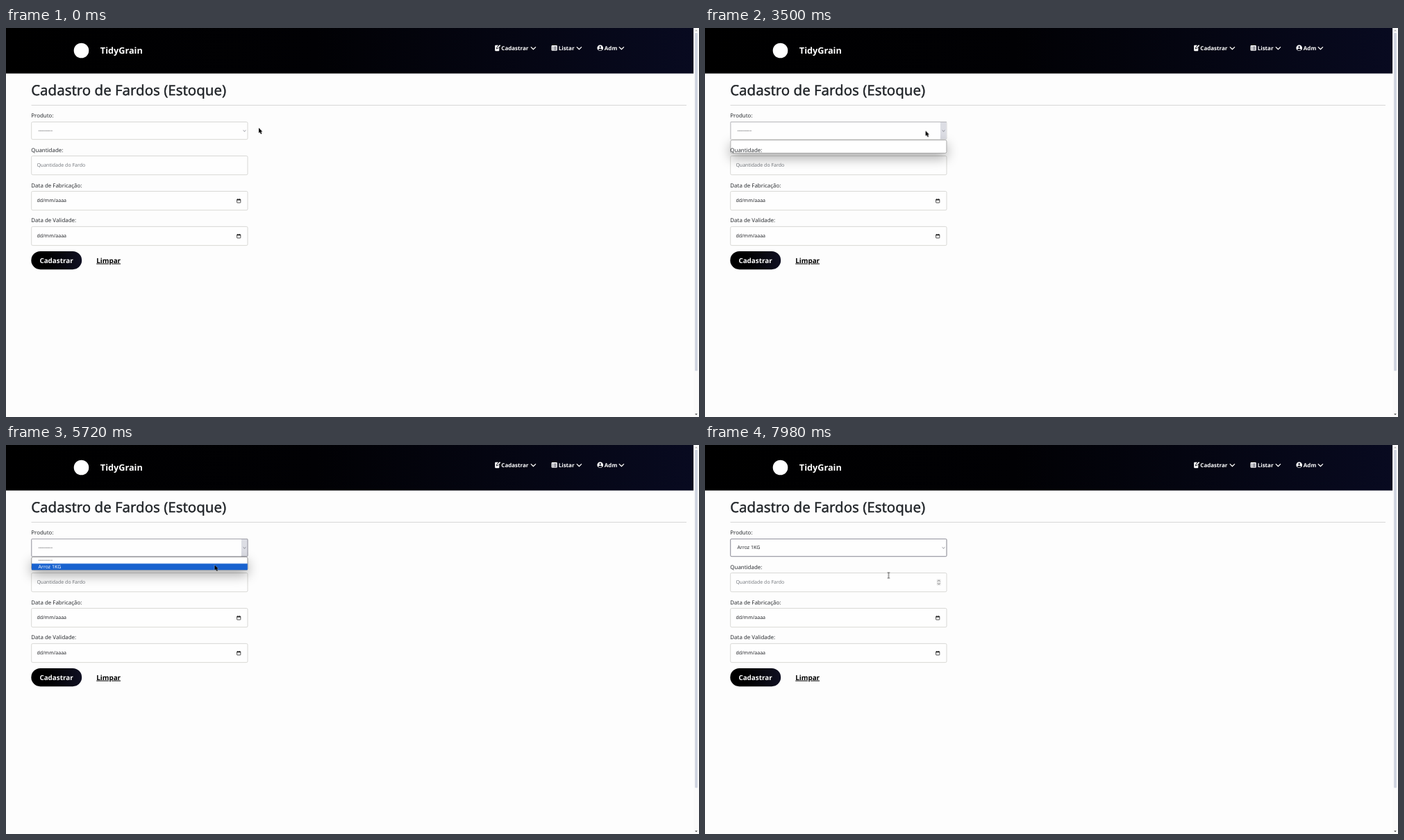
These frames come from a looping animation (998x561 px, 8 s). An HTML page:

```html
<!DOCTYPE html>
<html lang="pt-BR">
<head>
<meta charset="utf-8">
<title>Cadastro de Fardos</title>
<style>
  html, body { margin: 0; width: 100%; height: 100%; overflow: hidden; background: #fdfdfd; }
  svg { display: block; width: 998px; height: 561px; }
  text {
    font-family: "Noto Sans", "Open Sans", sans-serif;
    font-size: 7px; fill: #24262a;
    text-rendering: geometricPrecision; white-space: pre;
  }
  .title { font-size: 20.47px; fill: #212529; stroke: #212529; stroke-width: .4; }
  .label { font-size: 7.93px; fill: #2b2e32; }
  .hint { fill: #777b80; }
  .brand { font-size: 12.7px; font-weight: 700; fill: #fff; }
  .nav text { font-size: 8px; font-weight: 700; fill: #fff; }
  .action { font-size: 9.85px; font-weight: 700; }
  .field { fill: #fefefe; stroke: #cfcfcb; stroke-width: .8; }
  .chev { fill: none; stroke: #fff; stroke-width: 1.3; stroke-linecap: round; stroke-linejoin: round; }

  /* 1% of the loop is 80 ms */
  .step, .glide { animation: 8s infinite both; }
  .step { animation-timing-function: step-end; }
  .glide { animation-timing-function: linear; }

  .pointer { animation-name: move; }
  @keyframes move {
    0%, .25%    { transform: translate(364px, 144px); }
    10%, 17.5%  { transform: translate(363.6px, 143.6px); }
    19%, 23%    { transform: translate(358.5px, 143px); }
    29.75%      { transform: translate(345px, 143.8px); }
    33%, 33.25% { transform: translate(327.5px, 147.5px); }
    37%, 50.5%  { transform: translate(317.6px, 148.2px); }
    52.75%, 54% { transform: translate(326px, 151.3px); }
    60%         { transform: translate(300px, 165px); }
    63.25%, 64.5% { transform: translate(306.2px, 166px); }
    68.5%, 70.25% { transform: translate(301.5px, 174px); }
    71.5%, 73.5% { transform: translate(300.5px, 173px); }
    75%, 87.25% { transform: translate(301.6px, 174.4px); }
    91%         { transform: translate(335px, 178px); }
    96.5%, 97.75% { transform: translate(273px, 183px); }
    99.75%, 100% { transform: translate(264.4px, 188px); }
  }
  .arrow { animation-name: arrow; }
  @keyframes arrow { 0% { opacity: 1 } 98.25%, 100% { opacity: 0 } }
  .over-input { animation-name: over-input; }
  @keyframes over-input { 0% { opacity: 0 } 98.25%, 100% { opacity: 1 } }

  .over-select { animation-name: over-select; }
  @keyframes over-select { 0% { opacity: 0 } 30.5% { opacity: 1 } 84%, 100% { opacity: 0 } }
  .focus { animation-name: focus; }
  @keyframes focus { 0% { opacity: 0 } 44.5%, 100% { opacity: 1 } }

  .popup { animation-name: popup; }
  @keyframes popup { 0% { opacity: 0 } 43.73% { opacity: 1 } 82.48%, 100% { opacity: 0 } }
  .options { animation-name: options; }
  @keyframes options { 0%, 44% { opacity: 0 } 45.5%, 100% { opacity: 1 } }
  .mark { animation-name: mark; }
  @keyframes mark { 0% { transform: none } 66.5%, 100% { transform: translateY(9.2px) } }
  .first { animation-name: first; }
  @keyframes first { 0% { fill: #fff } 66.5%, 100% { fill: #24262a } }
  .second { animation-name: second; }
  @keyframes second { 0% { fill: #24262a } 66.5%, 100% { fill: #fff } }

  .empty { animation-name: empty; }
  @keyframes empty { 0% { opacity: 1 } 82.48%, 100% { opacity: 0 } }
  .chosen { animation-name: chosen; }
  @keyframes chosen { 0% { opacity: 0 } 82.48%, 100% { opacity: 1 } }
</style>
</head>
<body>
<svg viewBox="0 0 998 561">
  <defs>
    <linearGradient id="bar">
      <stop offset="0" stop-color="#000"/>
      <stop offset=".45" stop-color="#010104"/>
      <stop offset="1" stop-color="#080a20"/>
    </linearGradient>
    <linearGradient id="pill">
      <stop offset=".3" stop-color="#000"/>
      <stop offset="1" stop-color="#101022"/>
    </linearGradient>
    <filter id="blur" x="-20%" y="-300%" width="140%" height="700%">
      <feGaussianBlur stdDeviation="9"/>
    </filter>
    <path id="chev" class="chev" d="M-3.2-1.6 0 1.6 3.2-1.6"/>
    <g id="calendar">
      <rect x="-2.6" y="-2.2" width="5.2" height="4.9" rx=".5" fill="none" stroke="#222" stroke-width=".8"/>
      <path d="M-2.6-2.4h5.2v1.5h-5.2zM-1.8-3.1h.8v1h-.8zM1-3.1h.8v1H1z" fill="#222"/>
    </g>
  </defs>

  <rect width="998" height="561" fill="#fdfdfd"/>
  <rect width="990.3" height="65.6" fill="url(#bar)"/>

  <!-- scrollbar -->
  <rect x="990.3" width="7.7" height="561" fill="#fafafa"/>
  <rect x="992.2" y="7" width="3.7" height="487.5" rx="1.2" fill="#ced3df"/>
  <path d="M992.2 4.4h3.6L994 2.4z" fill="#aaa"/>
  <path d="M992.2 556.2h3.6l-1.8 2.1z" fill="#444"/>

  <circle cx="108.5" cy="32.5" r="10.8" fill="#fff"/>
  <text class="brand" x="135.8" y="36.8">TidyGrain</text>

  <g class="nav">
    <path d="M705.2 24.8h3.8l-2.7 3.4-.3 2.3 2.2-.5 2.1-2v4.2q0 1-1 1h-4.1q-1 0-1-1v-6.4q0-1 1-1z" fill="#fff"/>
    <path d="M707 29.4l.4-1.5 3-3.2q.8-.6 1.4 0t0 1.4l-3.2 2.9z" fill="#fff"/>
    <text x="713.3" y="31.7">Cadastrar</text>
    <use href="#chev" x="759.4" y="29.2"/>

    <rect x="785.6" y="25" width="8.2" height="7.8" rx="1.1" fill="#fff"/>
    <path d="M787 27.3h1.2m1 0h3.3M787 29.2h1.2m1 0h3.3M787 31.1h1.2m1 0h3.3" stroke="#05061a" stroke-width=".8"/>
    <text x="795.7" y="31.7">Listar</text>
    <use href="#chev" x="825.4" y="29.2"/>

    <circle cx="855.7" cy="28.8" r="4.3" fill="#fff"/>
    <circle cx="855.7" cy="27.5" r="1.3" fill="#05061a"/>
    <path d="M853.1 31.4q.4-1.7 1.8-1.7h1.6q1.4 0 1.8 1.7-2.6 2-5.2 0z" fill="#05061a"/>
    <text x="861.8" y="31.7">Adm</text>
    <use href="#chev" x="886.4" y="29.2"/>
  </g>

  <text class="title" x="36.2" y="97.4">Cadastro de Fardos (Estoque)</text>
  <path d="M36.5 111.4H980" stroke="#cfcfcf" stroke-width=".8"/>

  <!-- product select -->
  <text class="label" x="36.3" y="129.2">Produto:</text>
  <rect class="field" x="36.7" y="135.5" width="311.3" height="25.2" rx="1.8"/>
  <rect class="step over-select" x="338.8" y="135.9" width="8.9" height="24.4" fill="#dcdde4"/>
  <rect class="step focus" x="36.7" y="135.5" width="311.3" height="25.2" rx="1.2" fill="none" stroke="#8b8b98" stroke-width=".9"/>
  <path d="M341.6 147.4l1.9 1.8 1.9-1.8" fill="none" stroke="#6c6e76" stroke-width=".8"/>
  <text class="step empty" x="46.6" y="150.4">---------</text>
  <text class="step chosen" x="46.6" y="150.4">Arroz 1KG</text>

  <!-- quantity -->
  <rect class="field" x="36.7" y="184.5" width="311.3" height="27.2" rx="1.8"/>
  <text class="hint" x="44.4" y="200.4">Quantidade do Fardo</text>
  <g class="step over-input">
    <rect x="333.8" y="193.6" width="5.8" height="8.8" rx=".6" fill="#e6e6e6"/>
    <path d="M335 196.6l1.7-1.7 1.7 1.7M335 199.4l1.7 1.7 1.7-1.7" fill="none" stroke="#666" stroke-width=".8"/>
  </g>

  <!-- dates -->
  <text class="label" x="36.3" y="229.5">Data de Fabricação:</text>
  <rect class="field" x="36.7" y="235.5" width="311.3" height="27.2" rx="1.8"/>
  <text x="44.4" y="251.4">dd/mm/aaaa</text>
  <use href="#calendar" x="335.2" y="249.3"/>

  <text class="label" x="36.3" y="280.4">Data de Validade:</text>
  <rect class="field" x="36.7" y="286.4" width="311.3" height="27.2" rx="1.8"/>
  <text x="44.4" y="302.3">dd/mm/aaaa</text>
  <use href="#calendar" x="335.2" y="300.2"/>

  <rect x="36.3" y="322" width="72.9" height="26.2" rx="13.1" fill="url(#pill)"/>
  <text class="action" x="48.4" y="338.6" style="fill:#fff">Cadastrar</text>
  <text class="action" x="130.2" y="338.6" style="fill:#000" text-decoration="underline">Limpar</text>

  <!-- option list -->
  <g class="step popup">
    <rect x="37" y="168" width="311" height="19" fill="#000" opacity=".36" filter="url(#blur)"/>
    <rect x="36.8" y="135.9" width="301.9" height="24.4" fill="#fefefe"/>
    <text x="46.6" y="150.4">---------</text>
    <path d="M37 160.7V135.5H348" fill="none" stroke="#a5a5ac" stroke-width=".7"/>
    <rect x="36.9" y="161.6" width="311" height="18.8" rx="2" fill="#fff" stroke="#8d8d8d" stroke-width=".7"/>
  </g>
  <text class="label" x="36.3" y="178.6">Quantidade:</text>
  <g class="step popup">
    <g class="glide options">
      <rect x="36.9" y="161.6" width="311" height="18.8" rx="2" fill="#fff" stroke="#8d8d8d" stroke-width=".7"/>
      <rect class="step mark" x="37" y="161.8" width="310.8" height="9.2" fill="#1862cf"/>
      <text class="step first" x="46.6" y="168.4">---------</text>
      <text class="step second" x="46.6" y="177.6">Arroz 1KG</text>
    </g>
  </g>

  <!-- pointer -->
  <g class="glide pointer">
    <path class="step arrow" d="M0 0v7.4l1.7-1.5 1.3 3 1.4-.6-1.3-2.9h2.2z" fill="#000" stroke="#fff" stroke-width=".5" paint-order="stroke"/>
    <path class="step over-input" d="M-1.6-4h1.1q.5 0 .5.5v7q0 .5-.5.5h-1.1M1.6-4H.5Q0-4 0-3.5M1.6 4H.5Q0 4 0 3.5" fill="none" stroke="#222" stroke-width=".8"/>
  </g>
</svg>
</body>
</html>
```
